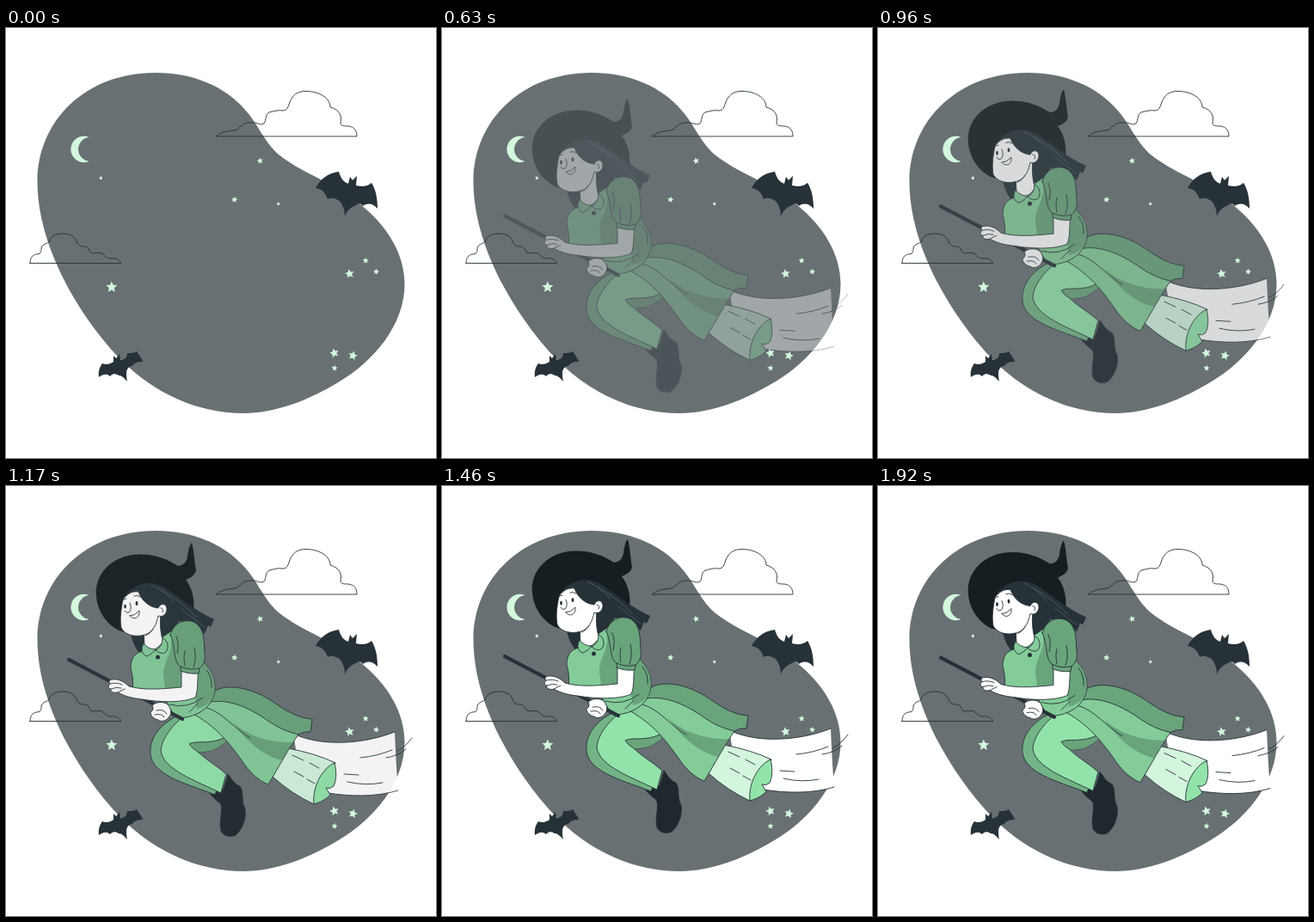
An HTML page that plays this animation: 500x500 px, repeating every 1.96 s.

```html
<!DOCTYPE html>
<html lang="en">
<head>
<meta charset="utf-8">
<title>Witch in flight</title>
<style>
  html, body { margin: 0; width: 100%; height: 100%; overflow: hidden; background: #fff; }
  svg { display: block; width: 100vw; height: 100vh; }
  .line { fill: none; }
  .ink { stroke: #263238; stroke-width: .9; stroke-linecap: round; stroke-linejoin: round; }
  .dark { fill: #263238; }
  .boot { fill: #1e282d; }
  .hat { fill: #171e22; }
  .white { fill: #fff; }
  .leaf { fill: #92e3a9; }
  .dress { fill: #83cc98; }
  .mid { fill: #73b487; }
  .deep { fill: #69a47b; }
  .shade { fill: #69a47b; stroke: none; }
  .pale { fill: #d3f4dd; }
</style>
</head>
<body>
<svg viewBox="0 0 500 500">
  <path fill="#687073" d="M174 52C215 52 256 66 283 101C298 121 303 137 322 151C350 171 379 179 412 205C444 231 463.500 263 463.500 298C463.500 345 428 387 388 411C352 433 313 448 276 448C226 448 174 427 133 385C95 346 36.500 262 36.500 178C37 108 92 52 174 52Z"/>

  <g class="line ink">
    <path d="M244.500 126H408C408 119 405 115 398 114C393 114 389 114 389 110C391 103 388 95 377 92C377 81 364 74 350 73.500C338 73 333 79 330 86C328 92 327 96 322 96C316 95 311 97 306 98C301 101 303 107 300 111C295 114 291 109 284 110C277 110 273 114 269 118C261 121 254 118 244.500 126Z"/>
    <path d="M28 273.500H133.500C132 269 127 267 122 268C117 268 115 265 112 262C107 260 102 263 98 261C97 257 95 254 90 254C86 254 83 252 82 248C80 242 74 239 66 239C57 239 51 243 50 249C46 251 41 252 41 257C41 261 40 263 35 263C31 264 28 267 28 273.500Z"/>
  </g>

  <g id="sky" fill="#d3f8dd">
    <path d="M96.500 127A15.200 15.200 0 1 0 96.500 155A14.100 14.100 0 0 1 96.500 127Z"/>
  </g>

  <g class="dark">
    <path d="M360 186C366 175 374 169 387 167C389 174 392 179 398 181L400 173L403 177L408 172L407 183C414 185 421 184 425 180C430 188 432 198 432 210C426 204 421 203 415 207C413 204 410 203 407 206C401 208 396 213 394 219C394 211 391 203 386 200Q379 196 374 199Q370 187 360 186Z"/>
    <path d="M108 406C107 399 109 394 112 390C116 392 121 391 125 388L125 381L128 384L132 379L133 386C138 386 141 383 141 378C145 378 149 378 152 376C155 380 157 384 159.500 388C154 388 149 389 147 393C143 393 141 396 140 400C140 404 140 407 141 411C137 407 135 404 131 404C127 401 123 402 121 405C117 401 112 403 108 406Z"/>
  </g>

  <g id="witch">
    <!-- broom tail -->
    <path class="white" d="M334 284C365 299 414 297 452 282C453 305 454 326 456 350C430 358 400 357 374 353L340 320Z"/>
    <g class="line ink">
      <path d="M334 284C365 299 414 297 452 282M374 353C400 357 430 358 456 350"/>
      <path d="M412 312Q432 310 449 303M442 312Q456 310 465 302M455 304Q464 300 472 289M393 331L410 332M397 340Q418 345 438 341"/>
    </g>
    <g class="ink">
      <path class="pale" d="M328 301Q360 307 383 318L358 366Q332 354 310 334Z"/>
      <path class="leaf" d="M382 318C368 324 356 345 358 366C366 364 374 359 377 355L372 347Q377 349 381 345C385 337 384 325 382 318Z"/>
      <path class="line" d="M333 309L346 315M353 318L364 324M335 328L346 334M350 337L359 342"/>
    </g>

    <!-- hat and hair -->
    <path class="hat" d="M105 125C102 97 125 76 155 75.500C173 75 188 81 200 89C207 88 210 84 211 78C212 71 213 65 216 62C219 73 219 84 221 94C220 100 214 103 209 105C216 114 220 127 218 143L170 160L138 166C121 162 107 145 105 125Z"/>
    <path class="dark" d="M136 128C146 109 166 105 183 113C202 125 221 142 242 151L238 160L235 158L231 168C222 160 211 155 201 153L190 170L176 185L158 193C151 187 147 178 145 168Z"/>
    <path class="line" stroke="#526068" stroke-width=".8" d="M169 111Q185 118 196 132M181 117Q206 132 222 149M205 140L231 160"/>

    <!-- legs and boots -->
    <g class="ink">
      <path class="boot" d="M236 352C239 357 244 361 249 365L258 356L250 346Z"/>
      <path class="boot" d="M258 331C262 335 264 342 272 345C277 352 273 363 278 371C280 384 274 396 267 402C260 405 253 403 250 397C247 386 253 373 249 364C250 354 255 344 258 331Z"/>
      <path class="mid" d="M212 259C184 266 164 288 168.500 311C174 334 213 343 243 355L248 342L200 310L230 266Z"/>
      <path class="leaf" d="M217 256C196 270 181 288 180 304C183 326 221 339 250 353L256 331C245 321 232 314 223 305C233 306 246 303 256 293L248 258Z"/>
    </g>
    <path class="shade" d="M213 296C222 291 238 298 257 287L256 293C246 303 233 306 223 305Q217 302 213 296Z"/>
    <path class="line ink" d="M223 305Q216 301 213 296C222 291 238 298 257 287"/>

    <!-- skirt: lit front, dark back panel, dark inner fold -->
    <path class="dress" d="M214 259C224 249 233 239 243 234L310 266L340 285C330 299 317 323 305 343C294 339 283 329 274 315C261 297 245 275 214 259Z"/>
    <path class="deep" d="M238 241Q240 236 243 234C260 225 288 232 309 246C328 259 340 266 356 267L354 282Q346 281 340 285Q322 281 306 270C288 257 262 243 238 247Z"/>
    <path class="shade" d="M263 270C281 287 307 295 333 294L321 315C297 309 278 291 263 270Z"/>
    <g class="line ink">
      <path d="M214 259C224 249 233 239 243 234C260 225 288 232 309 246C328 259 340 266 356 267L354 282Q346 281 340 285C330 299 317 323 305 343C294 339 283 329 274 315C261 297 245 275 214 259Z"/>
      <path d="M238 247C262 243 288 257 306 270Q322 281 340 285M233 254C251 258 266 279 284 289"/>
    </g>

    <!-- bodice -->
    <path class="dress ink" d="M159 188C150 190 145 196 145 208C148 218 148 227 147 238L186 246C190 253 193 261 201 266C219 265 236 257 242 239C246 223 238 210 230 201L202 158L180 173Z"/>
    <path class="shade" d="M192 174C194 191 183 199 183 216C184 226 186 232 184 239L220 241L222 255C232 253 239 247 242 237C245 221 238 210 230 202L200 165Z"/>
    <path class="line ink" d="M190 250Q211 256 229 242M233 210Q240 218 239 230M213 259L223 249"/>
    <path class="line" stroke="#263238" stroke-width="4.200" stroke-linecap="round" d="M73 198L205 267"/>

    <!-- arms -->
    <g class="ink">
      <path class="white" d="M170 251C176 246 184 247 188 250C192 255 193 260 190 264C187 269 181 271 177 268C172 267 168 263 168 259Q173 256 170 251Z"/>
      <path class="line" d="M175 257Q184 255 187 261M173 262Q182 260 184 265"/>
      <path class="white" d="M204 208L204 230C182 232 161 234 143 229C138 224 131 220 124 221C120 221 119 224 121 226C118 229 119 232 122 232C121 236 126 237 130 236C139 241 148 243 158 244C181 248 206 248 220 242C224 233 222 221 224 209Z"/>
      <path class="line" d="M121 226Q129 224 135 227M122 232Q129 229 134 231M130 236L138 232"/>
      <path class="deep" d="M191 169C195 155 208 149 220 155C231 162 230 176 231 190C232 199 230 204 225 208L224 214Q212 215 203 211L203 206C194 201 198 184 191 169Z"/>
      <path class="line" d="M203 206Q214 211 225 208M208 205Q206 195 208 188M218 207Q222 197 219 184M198 171Q202 180 199 191"/>
    </g>

    <!-- head -->
    <g class="ink">
      <path class="white" d="M160 164L161 182Q169 194 183 177Q178 165 180 143Z"/>
      <path class="dress" d="M160 179C156 186 158 192 164 194Q171 191 174 186Q165 186 160 179ZM174 187Q182 183 182 173C188 175 190 184 186 189Q181 193 174 187Z"/>
      <path class="white" d="M136 128C141 121 147 118 154 119C158 130 167 137 177 138C180 131 187 133 187 139C187 145 182 149 177 147C175 156 172 163 166 167C155 173 139 171 134 161C132 150 134 139 136 128Z"/>
      <path class="line" d="M144 132Q147 139 143 143Q139 144 138 141M135 130Q137 126 140 127M149 124Q153 122 156 125M180 138Q184 138 182 143M162 170Q168 168 171 162"/>
      <path class="white" d="M144 147Q150 147 155 141C156 149 149 153 144 147Z"/>
    </g>
    <ellipse class="dark" cx="138.500" cy="136" rx="1.400" ry="2.500"/>
    <ellipse class="dark" cx="152" cy="132.500" rx="1.400" ry="2.600"/>
    <circle class="dark" cx="176.500" cy="195" r="2.500"/>
  </g>
</svg>
<script>
const LOOP = 1960, STEPS = 47, FIRST_VISIBLE = 4;
const RISE = 30, REST_Y = 1.6;
const witch = document.getElementById('witch');
const sky = document.getElementById('sky');

function addStar(x, y, radius, tilt) {
  const points = Array.from({ length: 10 }, (_, i) => {
    const r = i % 2 ? radius * 0.46 : radius;
    const a = (tilt - 90 + i * 36) * Math.PI / 180;
    return [x + r * Math.cos(a), y + r * Math.sin(a)].map(v => v.toFixed(2));
  });
  const star = document.createElementNS('http://www.w3.org/2000/svg', 'polygon');
  star.setAttribute('points', points.join(' '));
  sky.append(star);
}

[
  [110.3, 174.5, 2.5, 0], [295.5, 154.5, 3.9, -15], [265.7, 199.5, 3.9, 10],
  [316.8, 204.4, 2.5, 0], [418.2, 270.5, 3.7, 0], [399.5, 285.8, 5.6, -10],
  [430.5, 283.4, 3.7, 10], [122.8, 301.4, 6.8, 0], [381.8, 378, 5.6, -15],
  [403.4, 381, 5.6, 15], [382, 395.5, 3.7, 5]
].forEach(star => addStar(...star));

const bezier = (a, b, s) => 3 * a * s * (1 - s) ** 2 + 3 * b * s * s * (1 - s) + s ** 3;

// Ease with a slight overshoot near the end.
function ease(progress) {
  let low = 0, high = 1;
  for (let i = 0; i < 24; i++) {
    const mid = (low + high) / 2;
    if (bezier(0.36, 0.5, mid) < progress) low = mid; else high = mid;
  }
  return bezier(-0.01, 1.38, (low + high) / 2);
}

function render(time) {
  const step = Math.floor((time % LOOP) * STEPS / LOOP);
  const amount = step < FIRST_VISIBLE ? 0 : ease(step / (STEPS - 1));
  witch.setAttribute('opacity', Math.min(1, Math.max(0, amount)));
  witch.setAttribute('transform', `translate(0 ${REST_Y + RISE * (1 - amount)})`);
}

const start = performance.now();
function tick() {
  render(performance.now() - start);
  requestAnimationFrame(tick);
}
tick();
</script>
</body>
</html>
```
